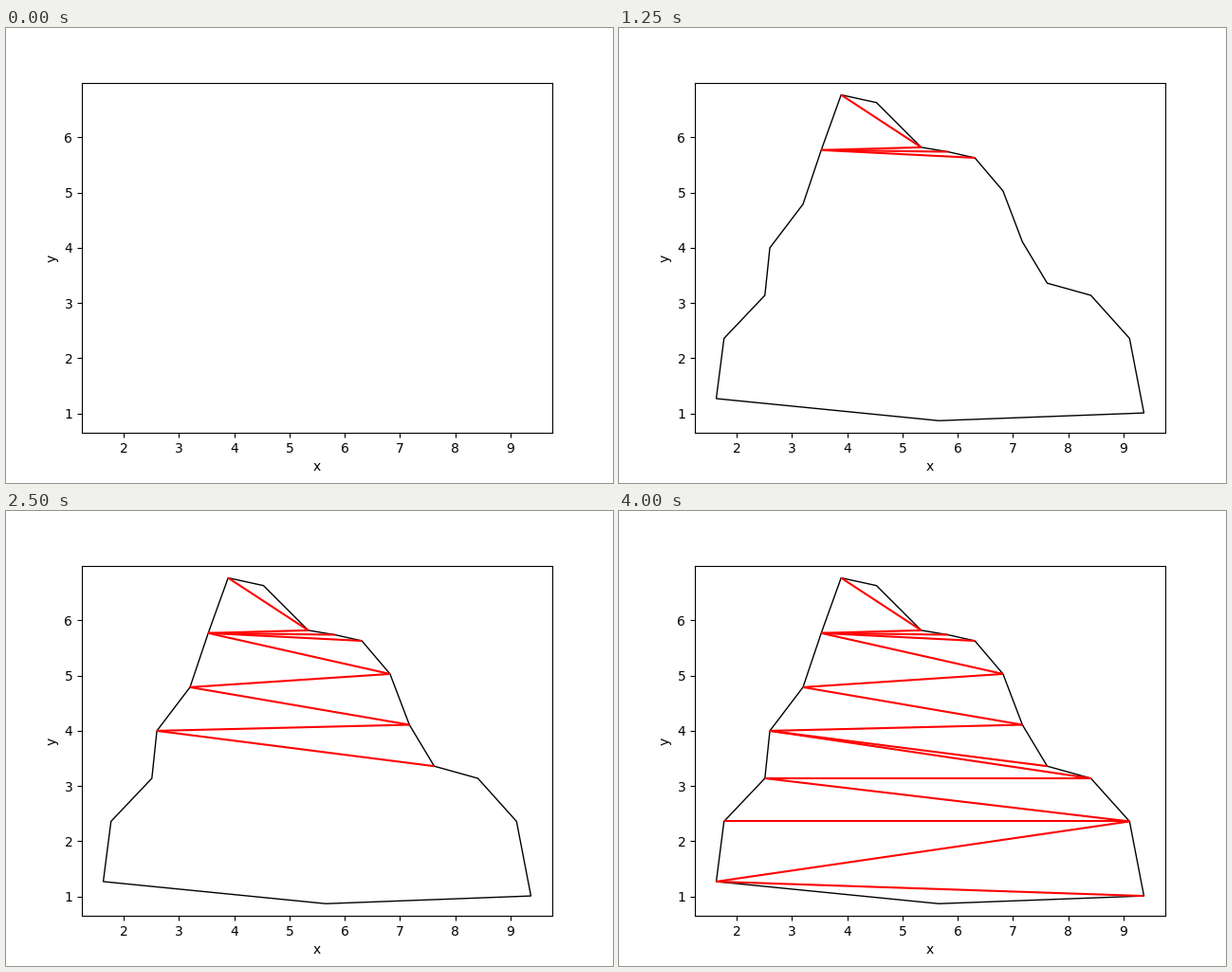
A matplotlib script that plays this animation: 640 px wide and 480 px high, repeating every 4.25 s.

```python
import matplotlib.pyplot as plt
from matplotlib.animation import FuncAnimation
from matplotlib.patches import Polygon

STEP_MS = 250

# Both chains of the y-monotone polygon, from top to bottom.
LEFT = [(3.89, 6.77), (3.53, 5.77), (3.20, 4.79), (2.60, 4.00),
        (2.51, 3.14), (1.77, 2.36), (1.63, 1.27)]
RIGHT = [(4.53, 6.63), (5.34, 5.82), (5.82, 5.74), (6.31, 5.63),
         (6.82, 5.03), (7.17, 4.11), (7.62, 3.36), (8.41, 3.14),
         (9.11, 2.36), (9.37, 1.01)]
BOTTOM = (5.66, 0.87)


def sweep(left, right):
    """Diagonals found by always stepping down to the higher next vertex."""
    i, j = 0, 1
    diagonals = [(left[i], right[j])]
    while i + 1 < len(left) or j + 1 < len(right):
        can_left, can_right = i + 1 < len(left), j + 1 < len(right)
        if can_left and (not can_right or left[i + 1][1] > right[j + 1][1]):
            i += 1
        else:
            j += 1
        diagonals.append((left[i], right[j]))
    return diagonals


fig, ax = plt.subplots(figsize=(6.4, 4.8), dpi=100)
ax.set_xlabel("x")
ax.set_ylabel("y")

# Equal scale on both axes, centred on the polygon.
x_span = 1.1 * (9.37 - 1.63)
y_span = x_span * 369.6 / 496
x_mid, y_mid = (1.63 + 9.37) / 2, (0.87 + 6.77) / 2
ax.set_xlim(x_mid - x_span / 2, x_mid + x_span / 2)
ax.set_ylim(y_mid - y_span / 2, y_mid + y_span / 2)

outline = ax.add_patch(Polygon(LEFT + [BOTTOM] + RIGHT[::-1],
                               closed=True, fill=False, ec="black", lw=1))
lines = [ax.plot(*zip(a, b), color="red", lw=1.5, solid_capstyle="butt",
                 scalex=False, scaley=False)[0]
         for a, b in sweep(LEFT, RIGHT)]


def update(frame):
    outline.set_visible(frame >= 1)
    for k, line in enumerate(lines):
        line.set_visible(frame >= k + 2)
    return [outline, *lines]


anim = FuncAnimation(fig, update, frames=len(lines) + 2,
                     interval=STEP_MS, repeat=True, repeat_delay=0)
plt.show()
```
